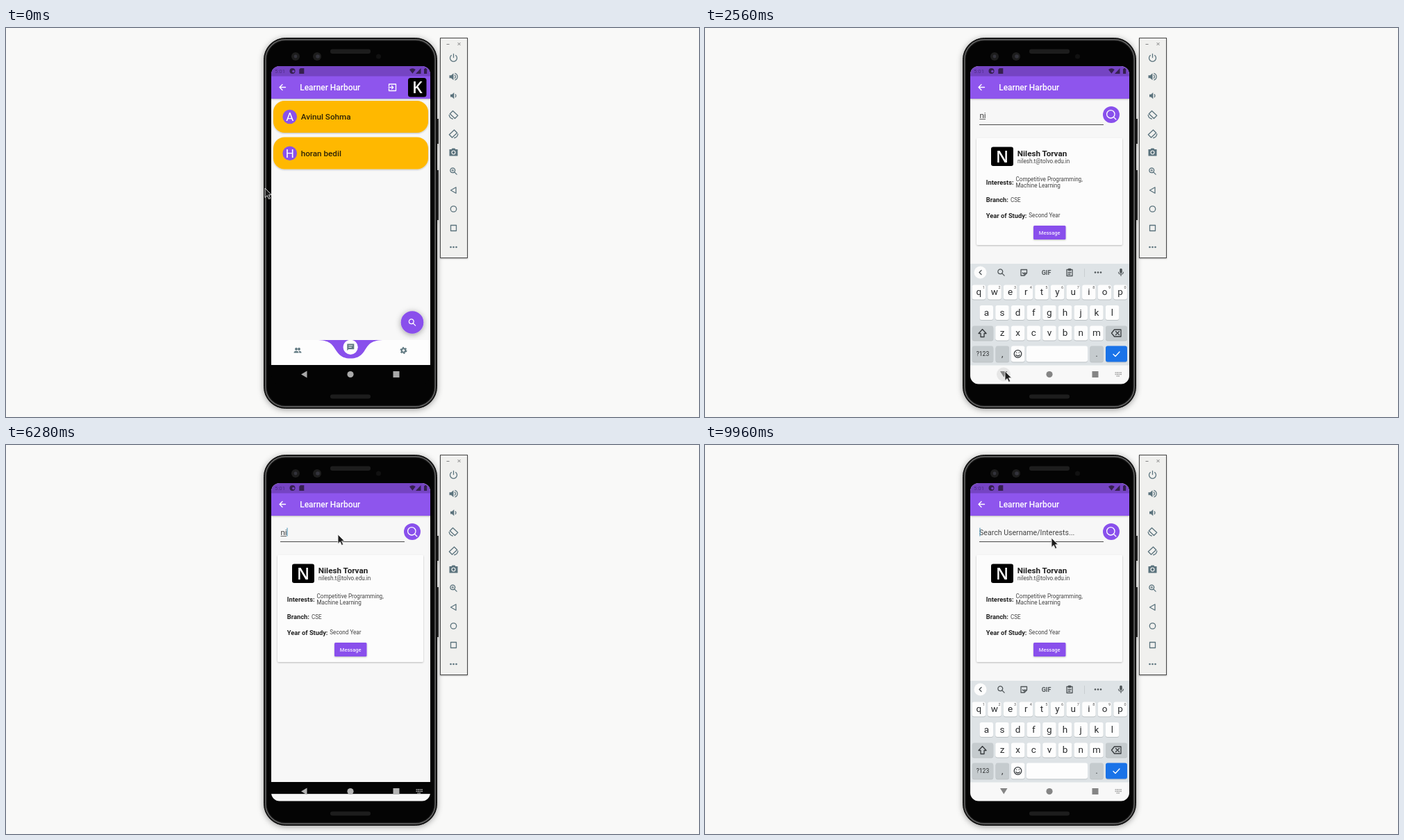
Recreate the animation shown at these times as an HTML page. Size 998 px wide and 561 px high, loop 10 s.

```html
<!DOCTYPE html>
<html lang="en">
<head>
<meta charset="utf-8">
<title>Phone search demo</title>
<style>
html, body { margin: 0; width: 100%; height: 100%; overflow: hidden; background: #f9f9f8; }
svg { display: block; width: 998px; height: 561px; font-family: Roboto, sans-serif; }
.m { text-anchor: middle; }
.b { font-weight: 700; }
.med { font-weight: 500; }
.initial { font: 600 23px "Open Sans", sans-serif; fill: #fff; text-anchor: middle; }
.line { fill: none; stroke: currentColor; stroke-width: 1.3; stroke-linecap: round; stroke-linejoin: round; }
.solid { fill: currentColor; }
.small { font-size: 8.15px; fill: #444; }
.label { font-size: 9.3px; font-weight: 700; fill: #222; }

/* 1% = 100 ms */
.step { animation: 10s step-end infinite; }
#list { animation-name: list; }
#underline { animation-name: underline; }
#typed { animation-name: typed; }
#second { animation-name: second; }
#hint { animation-name: hint; }
#caret { animation-name: caret; }
#caretPos { animation-name: caretPos; }
#words { animation-name: words; }
#tools { animation-name: tools; }
#ripple { animation-name: ripple; }
#navBack { animation-name: navBack; }
#navDown { animation-name: navDown; }
#navKey { animation-name: navKey; }
#nav { animation-name: nav; }
#kbd { animation: kbd 10s linear infinite; }
#panel { animation: panel 10s linear infinite; }
#mouse { animation: mouse 10s ease-in-out infinite; }

@keyframes list { 0% { opacity: 1 } .4%, 100% { opacity: 0 } }
@keyframes underline { 0% { opacity: 1 } 27% { opacity: 0 } 62% { opacity: 1 } 89%, 100% { opacity: 0 } }
@keyframes typed { 0% { opacity: 1 } 89%, 100% { opacity: 0 } }
@keyframes second { 0% { opacity: 1 } 87.4%, 100% { opacity: 0 } }
@keyframes hint { 0% { opacity: 0 } 89%, 100% { opacity: 1 } }
@keyframes caret {
  0%, 7.5%, 17.5%, 27.5%, 37.5%, 47.5%, 57.5%, 62%, 72%, 82%, 89%, 99%, 100% { opacity: 1 }
  2.5%, 12.5%, 22.5%, 32.5%, 42.5%, 52.5%, 61.5%, 67%, 77%, 87%, 94% { opacity: 0 }
}
@keyframes caretPos { 0% { transform: none } 87.4% { transform: translateX(-3px) } 89%, 100% { transform: translateX(-9px) } }
@keyframes words { 0% { opacity: 1 } 18% { opacity: 0 } 62% { opacity: 1 } 89%, 100% { opacity: 0 } }
@keyframes tools { 0% { opacity: 0 } 18% { opacity: 1 } 62% { opacity: 0 } 89%, 100% { opacity: 1 } }
@keyframes ripple { 0% { opacity: 0 } 24.4% { opacity: 1 } 27.2%, 100% { opacity: 0 } }
@keyframes nav {
  0% { color: #a9a9a9 } .4% { color: #858585 } 27.6% { color: #fff }
  62% { color: #b4b4b4 } 64%, 100% { color: #858585 }
}
@keyframes navBack { 0% { opacity: 1 } .4% { opacity: 0 } 27.6% { opacity: 1 } 64%, 100% { opacity: 0 } }
@keyframes navDown { 0% { opacity: 0 } .4% { opacity: 1 } 27.6% { opacity: 0 } 64%, 100% { opacity: 1 } }
@keyframes navKey { 0% { opacity: 0 } .4% { opacity: 1 } 27.6% { opacity: 0 } 62%, 100% { opacity: 1 } }
@keyframes kbd {
  0% { transform: translateY(174px); animation-timing-function: step-end }
  .4% { transform: none }
  26.6% { transform: none; animation-timing-function: cubic-bezier(.4, 0, 1, 1) }
  28.6% { transform: translateY(174px) }
  62.4% { transform: translateY(174px); animation-timing-function: cubic-bezier(.4, 0, .2, 1) }
  65.2%, 100% { transform: none }
}
@keyframes panel { 0%, 28% { opacity: 1 } 28.6%, 62.8% { opacity: 0 } 64%, 100% { opacity: 1 } }
@keyframes mouse {
  0% { transform: translate(373px, 231px); animation-timing-function: step-end }
  .4%, 16% { transform: translate(488px, 147px) }
  23.6%, 27.4% { transform: translate(432px, 495px) }
  36.5%, 55% { transform: translate(469px, 179px) }
  60.5%, 90% { transform: translate(478px, 129px) }
  95%, 100% { transform: translate(499px, 134px) }
}
</style>
</head>
<body>
<svg viewBox="0 0 998 561">
  <defs>
    <clipPath id="screen"><rect x="382" y="55" width="229" height="458.5" rx="12"/></clipPath>
    <filter id="soft" x="-30%" y="-30%" width="160%" height="160%">
      <feDropShadow dx="0" dy="1" stdDeviation="1" flood-opacity=".25"/>
    </filter>
    <filter id="wide" x="-30%" y="-30%" width="160%" height="160%">
      <feDropShadow dx="0" dy="1.5" stdDeviation="4.5" flood-opacity=".38"/>
    </filter>
    <path id="lens" class="line" d="M1.6 1.6L4.6 4.6M2.2 -1.2a3.4 3.4 0 1 1 -6.8 0a3.4 3.4 0 1 1 6.8 0"/>
    <path id="mic" class="solid" d="M-1.8 -4a1.8 1.8 0 0 1 3.6 0v3.6a1.8 1.8 0 0 1 -3.6 0zM-4 -.8h1.1a2.9 2.9 0 0 0 5.8 0h1.1a4 4 0 0 1 -3.4 3.9v2.2h-1.2v-2.2a4 4 0 0 1 -3.4 -3.9z"/>
    <g id="dots" class="solid"><circle cx="-4" r="1.3"/><circle r="1.3"/><circle cx="4" r="1.3"/></g>
    <g id="turn" class="line"><path d="M-1 -5.5L6.200 1.200L2 5.500L-5.200 -1.200Z"/><path d="M-6.300 .5a6.500 6.500 0 0 0 5 5.500"/></g>
    <g id="status"><rect x="382" y="55" width="229" height="14.5" fill="#7544c3"/>
      <g color="#35204f"><text x="387" y="65" font-size="7.8" fill="#502d89">5:01</text>
      <circle class="solid" cx="412.5" cy="62" r="4"/><circle cx="413.8" cy="62.5" r="1.7" fill="#7544c3"/>
      <path class="solid" d="M424 58h5.3v8h-7v-6.2zM581 60a6.3 6.3 0 0 1 8.8 0l-4.4 5.8zM597.5 58v8h-7.5zM602 59h1v-1h2.2v1h1v7h-4.2z"/></g></g>
    <g id="bar"><rect x="382" y="69" width="229" height="33" fill="#8e55ed" filter="url(#soft)"/>
      <path class="line" color="#fff" d="M402.5 85.5H394M398 81.5L394 85.5L398 89.5"/>
      <text class="med" x="423.3" y="90" font-size="11.9" fill="#fff">Learner Harbour</text></g>
  </defs>

  <!-- phone body -->
  <g filter="url(#wide)">
    <path d="M620 131h3v36h-3zM620 205h3v72h-3z" fill="#222"/>
    <rect x="371.5" y="14.5" width="249" height="534" rx="31" fill="#171717" stroke="#0b0b0b"/>
  </g>
  <rect x="373.800" y="16.800" width="244.400" height="529.400" rx="28.500" fill="none" stroke="#686868" stroke-width="1.400"/>
  <rect x="376" y="19" width="240" height="525" rx="26" fill="#040404"/>
  <g fill="#1d1d1d">
    <rect x="467" y="30.5" width="58" height="6.5" rx="3"/>
    <rect x="467" y="528.5" width="58" height="6" rx="3"/>
    <circle cx="417" cy="41" r="6"/><circle cx="448" cy="41" r="6"/><circle cx="536.5" cy="41" r="3.5" fill="#111"/>
  </g>
  <g fill="#33333b"><circle cx="417" cy="41" r="2.4"/><circle cx="449" cy="41" r="2.8"/></g>

  <g clip-path="url(#screen)">
    <!-- search page -->
    <rect x="382" y="55" width="229" height="431" fill="#f7f7f7"/>
    <rect x="382" y="486" width="229" height="28" fill="#040404"/>
    <use href="#bar"/><use href="#status"/>
    <path d="M395 139.5H574" stroke="#4a4a4a"/>
    <g id="typed" class="step" font-size="11.5" fill="#3c3c3c">
      <text x="395.5" y="129.5">n</text><text id="second" class="step" x="401.8" y="129.5">i</text>
    </g>
    <path id="underline" class="step" d="M395.5 131.5H404" stroke="#555" stroke-width=".9"/>
    <text id="hint" class="step" x="395" y="129.5" font-size="10.6" fill="#444">Search Username/Interests...</text>
    <g id="caretPos" class="step"><path id="caret" class="step" d="M405 119.5V131.5" stroke="#4b93b5" stroke-width="1.1"/></g>
    <circle cx="585" cy="125" r="12" fill="#8950ec"/>
    <g class="line" color="#fff"><circle cx="584.3" cy="124.3" r="5.7"/><path d="M588.5 128.5L591.8 131.8"/></g>

    <rect x="391" y="158.5" width="210" height="154.5" rx="2" fill="#fcfcfc" filter="url(#soft)"/>
    <rect x="412" y="171.5" width="32" height="27.5" rx="3"/>
    <text class="initial" x="428" y="193.7">N</text>
    <text class="b" x="449.7" y="185" font-size="11.7" fill="#222">Nilesh Torvan</text>
    <text class="small" x="450" y="195">nilesh.t@tolvo.edu.in</text>
    <text class="label" x="404.8" y="225.5">Interests:</text>
    <text class="small" x="447.5" y="221">Competitive Programming,</text>
    <text class="small" x="447.5" y="230">Machine Learning</text>
    <text class="label" x="404.8" y="251">Branch:</text>
    <text class="small" x="440" y="250.5">CSE</text>
    <text class="label" x="404.8" y="273.5">Year of Study:</text>
    <text class="small" x="466.3" y="272.7">Second Year</text>
    <rect x="473" y="285" width="46.5" height="20" rx="1.5" fill="#8950ec" filter="url(#soft)"/>
    <text class="m med" x="496.2" y="297.7" font-size="7.5" fill="#f1e9ff">Message</text>

    <!-- keyboard -->
    <g id="kbd">
      <rect x="382" y="340" width="229" height="174" fill="#f8f8f8"/>
      <g id="panel">
        <rect x="382" y="340" width="229" height="146.5" fill="#dee3e6"/>
        <circle cx="396.5" cy="352.5" r="9" fill="#fcfcfc"/>
        <g color="#4f5558">
          <use href="#mic" x="599" y="352.5"/>
          <g id="words" class="step">
            <path class="line" d="M395 349.5L398 352.5L395 355.5"/>
            <path d="M462.5 346V360M529 346V360" stroke="#c2c8cb"/>
            <g class="m" font-size="12" fill="#596064"><text x="433" y="357">n</text><text x="495.5" y="357">no</text><text x="558" y="357">not</text></g>
          </g>
          <g id="tools" class="step">
            <path class="line" d="M398 349.5L395 352.5L398 355.5"/>
            <use href="#lens" x="426.5" y="352.5"/>
            <path class="line" d="M455 348.5h8.5v5l-3.5 3.5h-5zM463.5 353.5h-3.5v3.5M457.3 353q1.5 2 2.7 0"/>
            <text class="m b" x="491.5" y="356" font-size="9" fill="#4f5558">GIF</text>
            <path class="line" d="M521 348.5h8v9h-8zM523.5 347.5h3v2h-3zM523 352.5h4M523 355h3"/>
            <path d="M546.5 347V359" stroke="#c9ced1"/>
            <use href="#dots" x="566" y="352.5"/>
          </g>
        </g>
        <g id="keys"></g>
        <g color="#373b3e">
          <path class="line" d="M399.5 434.5l5.5 6h-3v5h-5v-5h-3z"/>
          <path class="line" d="M585.5 440l4 -5h9.5v10h-9.5zM591.5 437.5l5 5m0 -5l-5 5"/>
          <g class="line"><circle cx="450.5" cy="470" r="5.3"/><path d="M447.8 471.5q2.7 3 5.4 0M448.7 468.2v.2M452.3 468.2v.2"/></g>
          <path class="line" color="#fff" d="M588 470.5l3 3l6 -6.5"/>
        </g>
      </g>
    </g>

    <!-- system buttons -->
    <g id="nav" class="step">
      <circle id="ripple" class="step" cx="430" cy="499.5" r="10" fill="#e6e6e6"/>
      <path id="navBack" class="step solid" d="M425 499.5l8.5 -5v10z"/>
      <path id="navDown" class="step solid" d="M425 495h10.5l-5.2 8.5z"/>
      <circle class="solid" cx="496" cy="499.5" r="4.6"/>
      <rect class="solid" x="557.5" y="495" width="9" height="9"/>
    </g>
    <path id="navKey" class="step line" color="#a5a5a5" stroke-dasharray="1 1.5" d="M591 497h9M591 499.5h9M593 502h5"/>

    <!-- chat list -->
    <g id="list" class="step">
      <rect x="382" y="55" width="229" height="431" fill="#f8f8f8"/>
      <use href="#bar"/><use href="#status"/>
      <path class="line" color="#fff" d="M551.5 84v-3h10v9.5h-10v-3M551 85.7h6.5M555.5 83.5l2.2 2.2l-2.2 2.2"/>
      <rect x="579" y="72" width="26.5" height="27.5" rx="3.5"/>
      <text class="initial" x="592.3" y="94">K</text>
      <g fill="#ffb800" filter="url(#soft)">
        <rect x="385" y="105" width="223" height="46" rx="16"/>
        <rect x="385" y="157.5" width="223" height="46" rx="16"/>
      </g>
      <g fill="#8950ec"><circle cx="408.7" cy="128" r="10.3"/><circle cx="408.7" cy="180.8" r="10.3"/></g>
      <g class="m" font-size="17" fill="#fff"><text x="408.7" y="134">A</text><text x="408.7" y="187">H</text></g>
      <g class="med" font-size="11.7" fill="#2c2205"><text x="424.7" y="132.3">Avinul Sohma</text><text x="424.7" y="185">horan bedil</text></g>
      <circle cx="585" cy="424.5" r="16.3" fill="#8950ec" filter="url(#wide)"/>
      <use href="#lens" x="585" y="424.5" color="#fff"/>
      <rect x="382" y="450" width="229" height="36" fill="#fdfdfd"/>
      <path d="M450 450C468 451 470 457 476 466C482 475 489 476.5 496 476.5S510 475 516 466S524 451 542 450Z" fill="#8950ec"/>
      <circle cx="496.2" cy="460.3" r="10.6" fill="#fdfdfd"/>
      <g color="#5f7880">
        <path class="solid" d="M491.3 455.5h10v7.8h-8l-2 2z"/>
        <path d="M493.3 458h6M493.3 460.5h4.5" stroke="#fff" stroke-width=".9"/>
        <g class="solid"><circle cx="418" cy="463" r="1.9"/><circle cx="422" cy="463" r="1.9"/><path d="M414.5 468.5q0 -2.8 3.5 -2.8t3.5 2.8zM422.3 468.5q0 -1.6 -.8 -2.7q4 -.2 4 2.7z"/></g>
        <circle cx="572.5" cy="465" r="2.8" fill="none" stroke="currentColor" stroke-width="2"/>
        <circle cx="572.5" cy="465" r="4.3" fill="none" stroke="currentColor" stroke-width="1.4" stroke-dasharray="2.25"/>
      </g>
    </g>
  </g>

  <!-- emulator tool strip -->
  <rect x="625.5" y="14.5" width="39" height="317" fill="#f0f0ee" stroke="#444" filter="url(#soft)"/>
  <path d="M634.5 23.5h4M650.5 21l4 4m0 -4l-4 4" stroke="#777" stroke-width=".9"/>
  <g transform="translate(644.5 0)" color="#5b737d">
    <path class="line" d="M0 37.5v5M-3.2 39.5a5 5 0 1 0 6.4 0"/>
    <path class="solid" d="M-6 68.2h2.6l3.4 -3v10l-3.4 -3h-2.6z"/><path class="line" d="M1.8 68a2.8 2.8 0 0 1 0 4.4M2.3 65.5a5 5 0 0 1 0 9.4"/>
    <path class="solid" d="M-4.5 95.8h2.3l3 -2.7v9.2l-3 -2.7h-2.3z"/><path class="line" d="M2.7 96a2.5 2.5 0 0 1 0 3.6"/>
    <use href="#turn" y="125"/>
    <use href="#turn" transform="translate(0 152.5) scale(-1 1)"/>
    <path class="solid" d="M-6 175h3l1.2 -1.6h3.6l1.2 1.6h3v9.5h-12z"/>
    <circle cy="179.5" r="2.5" fill="currentColor" stroke="#f0f0ee" stroke-width="1.2"/>
    <use href="#lens" y="206.5"/><path class="line" style="stroke-width:.9" d="M-2.7 205.3h3M-1.2 203.8v3"/>
    <path class="line" d="M-4 234l7.5 -4.3v8.6z"/>
    <circle class="line" cy="261" r="4.2"/>
    <rect class="line" x="-4" y="284.5" width="8" height="8"/>
    <use href="#dots" y="316"/>
  </g>

  <path id="mouse" d="M0 0V13.5L3.2 10.6L5.4 15.5L7.7 14.5L5.5 9.7H9.5Z" fill="#1c1c1c" stroke="#eee" stroke-width=".9"/>
</svg>
<script>
const out = [];
const grey = '#c5cbce', white = '#fdfdfd';

function key(x, y, w, label = '', fill = white, size = 13.5, h = 21) {
  const left = x - w / 2;
  out.push(
    `<rect x="${left}" y="${y + 1}" width="${w}" height="${h}" rx="3" fill="#bcc2c5"/>`,
    `<rect x="${left}" y="${y}" width="${w}" height="${h}" rx="3" fill="${fill}"/>`,
    `<text class="m" x="${x}" y="${y + h / 2 + size * .33}" font-size="${size}" fill="#2a2c2e">${label}</text>`);
}
const bottomKey = (x, w, label, fill, size = 12) => key(x, 458.5, w, label, fill, size, 23);

[['qwertyuiop', 394.3, 370.5], ['asdfghjkl', 405.3, 400], ['zxcvbnm', 428, 429.5]].forEach(([row, x0, y], r) =>
  [...row].forEach((ch, i) => {
    const x = x0 + i * 22.65;
    key(x, y, 19.5, ch);
    if (!r) out.push(`<text class="m" x="${x + 7}" y="${y + 5.5}" font-size="5.5" fill="#555">${(i + 1) % 10}</text>`);
  }));
key(400, 429.5, 30.5, '', grey);
key(592.5, 429.5, 31, '', grey);
bottomKey(400, 30.5, '?123', grey, 8.5);
bottomKey(428.3, 19.5, ',', grey);
bottomKey(450.7, 19.5, '', white);
bottomKey(507, 88, '', white);
bottomKey(564, 19.5, '.', grey);
bottomKey(592.5, 31, '', '#1a73e8');
document.getElementById('keys').innerHTML = out.join('');
</script>
</body>
</html>
```
